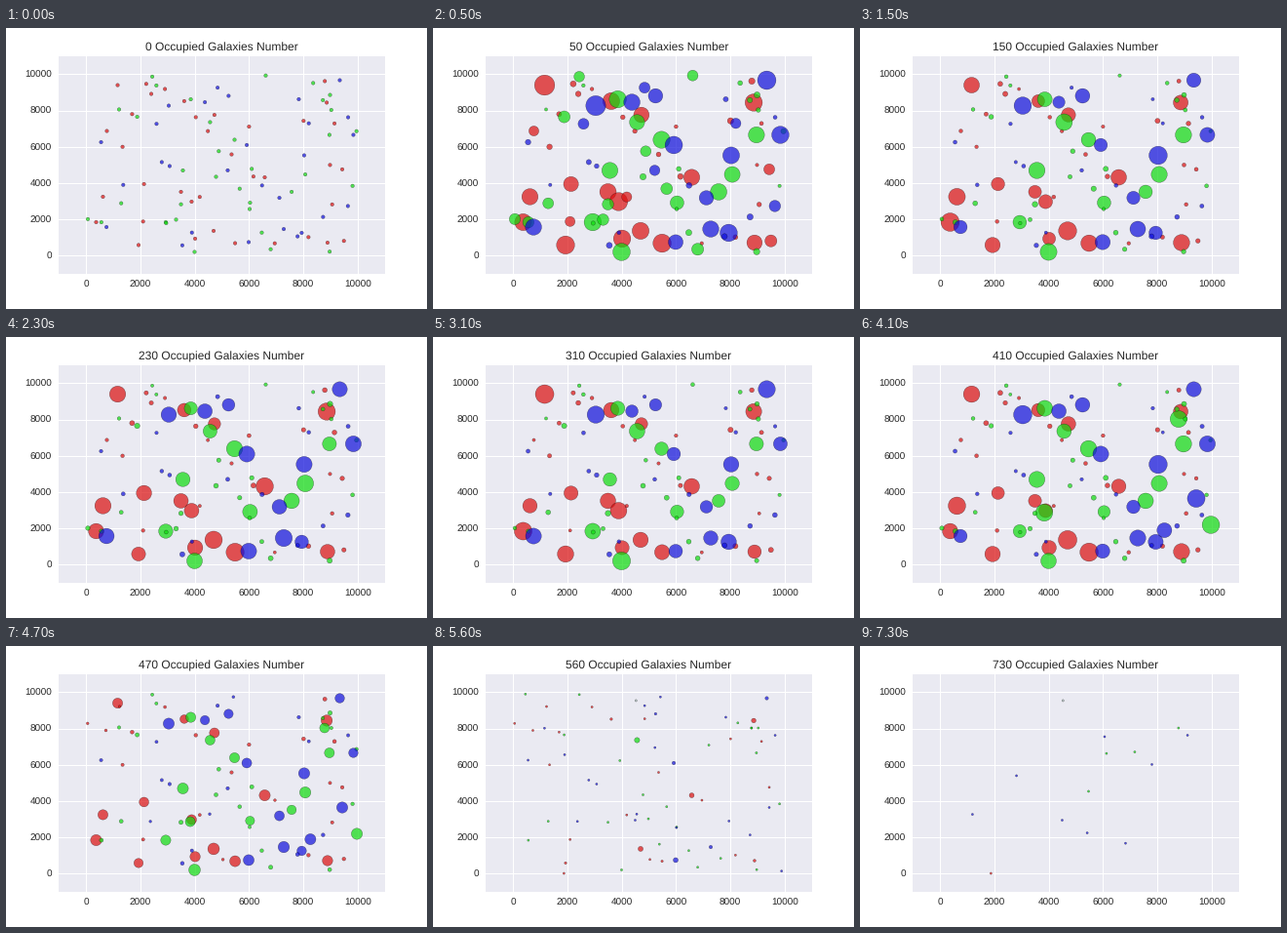
Animation of 432x288 px, one loop 7400 ms. Source, as a matplotlib script:

```python
import numpy as np
import matplotlib.pyplot as plt
from matplotlib.animation import FuncAnimation

plt.rcParams["font.family"] = "Liberation Sans"
plt.rcParams["text.hinting"] = "none"

W, H, DPI = 432, 288, 72
FRAMES, INTERVAL = 74, 100
GROW = 5                    # frames a galaxy needs to reach full size
DECLINE, FALLEN = 41, 55    # frames between which all empires shrink
START, TINY = 1.8, 1.1      # radii in pixels
INK = "0.15"

COLORS = {"red": (0.86, 0.05, 0.05), "green": (0.05, 0.86, 0.05),
          "blue": (0.05, 0.05, 0.86), "grey": (0.65, 0.72, 0.7)}

# Capitals, in thousands of units
CAPITALS = {
    "red": [(1.17, 9.40), (2.14, 3.95), (0.63, 3.25), (0.38, 1.85),
            (1.94, 0.59), (3.50, 3.52), (3.89, 2.98), (4.02, 0.94),
            (4.70, 1.37), (5.49, 0.69), (6.58, 4.32), (8.89, 0.72),
            (8.86, 8.44), (3.62, 8.52), (4.73, 7.76)],
    "green": [(4.57, 7.36), (3.86, 8.62), (5.47, 6.39), (3.57, 4.70),
              (2.94, 1.85), (6.04, 2.92), (7.57, 3.52), (8.07, 4.48),
              (8.96, 6.66), (4.00, 0.21)],
    "blue": [(4.38, 8.46), (5.25, 8.81), (3.05, 8.27), (5.92, 6.10),
             (9.34, 9.67), (9.84, 6.66), (0.76, 1.58), (7.12, 3.19),
             (7.28, 1.47), (7.94, 1.26), (5.99, 0.75), (8.03, 5.53)],
}
COLONIES = {"green": [(8.78, 8.03), (9.97, 2.20), (3.84, 2.87)],
            "blue": [(9.43, 3.65), (8.26, 1.90)]}
VILLAGES = {"red": 22, "green": 25, "blue": 16}
WANDERERS = {"red": 6, "green": 7, "blue": 9}

# Outposts left at the end, in order of founding
OUTPOSTS = [("grey", 4.53, 9.54), ("red", 1.88, 0.02), ("green", 8.78, 8.03),
            ("blue", 4.50, 2.95), ("blue", 2.82, 5.40), ("green", 6.13, 6.63),
            ("blue", 6.06, 7.55), ("blue", 7.80, 6.02), ("green", 5.47, 4.54),
            ("blue", 5.42, 2.25), ("green", 7.17, 6.71), ("blue", 9.11, 7.63),
            ("blue", 6.83, 1.68), ("blue", 1.20, 3.27)]

rng = np.random.default_rng(12)
galaxies = []


def add(color, x, y, born, dead, peak=TINY, boom=0.0, tail=TINY):
    galaxies.append((*COLORS[color], x, y, born, dead, peak, boom, tail))


for color in CAPITALS:
    for x, y in CAPITALS[color]:
        add(color, x, y, 0, rng.integers(47, 63), rng.uniform(6.8, 8.8),
            0.8, rng.uniform(TINY, 2.7))
    for x, y in COLONIES.get(color, []):
        add(color, x, y, rng.integers(32, 37), rng.integers(50, 63), 8.3)
    for x, y in rng.uniform(0, 10, (VILLAGES[color], 2)):
        add(color, x, y, 0, rng.integers(42, 64), rng.uniform(1.7, 2.6),
            rng.choice([0, 0.7, 3.5]))
    for x, y in rng.uniform(0, 10, (WANDERERS[color], 2)):
        add(color, x, y, rng.integers(43, 56), rng.integers(57, 73))

for i, (color, x, y) in enumerate(OUTPOSTS):
    founded = round(50 + i * (FRAMES - 51) / (len(OUTPOSTS) - 1))
    add(color, x, y, founded, FRAMES)

data = np.array(galaxies, dtype=float)
rgb = data[:, :3]
gx, gy, born, dead, peak, boom, tail = data[:, 3:].T
phase = rng.uniform(0, 2 * np.pi, len(data))
period = rng.uniform(18, 32, len(data))


def radii(n):
    grow = np.clip((n - born) / GROW, 0, 1)
    fade = np.clip((n - DECLINE) / (FALLEN - DECLINE), 0, 1)
    wave = 1 + 0.1 * np.sin(2 * np.pi * n / period + phase)
    full = peak * wave + boom * np.exp(-((n - GROW) / 5) ** 2)
    low = START + (tail - START) * fade
    r = low + (full - low) * grow * (1 - fade)
    return np.where((n >= born) & (n < dead), r, 0)


fig = plt.figure(figsize=(W / DPI, H / DPI), dpi=DPI, facecolor="white")
ax = fig.add_axes([0.125, 0.125, 0.775, 0.775], facecolor="#EAEAF2")
ax.set_xlim(-1000, 11000)
ax.set_ylim(-1000, 11000)
ax.set_xticks(range(0, 10001, 2000))
ax.set_yticks(range(0, 10001, 2000))
ax.grid(color="white", linewidth=1)
ax.set_axisbelow(True)
ax.tick_params(length=0, pad=7, labelsize=10, labelcolor=INK)
for spine in ax.spines.values():
    spine.set_visible(False)
title = ax.set_title("", fontsize=12, color=INK, pad=5)
dots = ax.scatter(gx * 1000, gy * 1000, c=rgb, alpha=0.7, edgecolors="black")


def draw(n):
    r = radii(n)
    dots.set_sizes((2 * r) ** 2)
    dots.set_linewidths(np.where(r > 0, 0.3, 0))
    title.set_text(f"{n * 10} Occupied Galaxies Number")
    return dots, title


anim = FuncAnimation(fig, draw, frames=FRAMES, interval=INTERVAL,
                     repeat=True, repeat_delay=0, blit=False)
plt.show()
```
